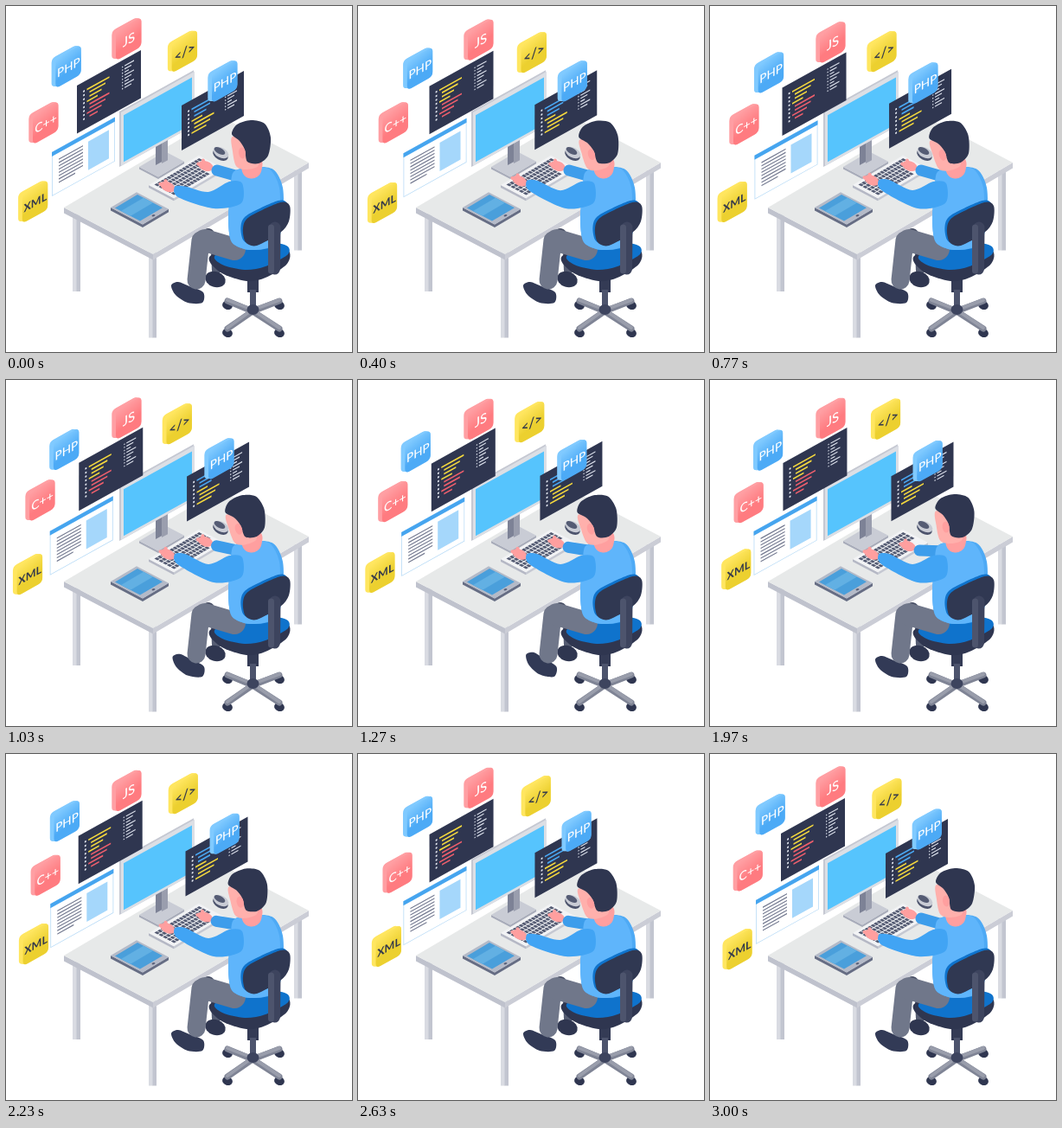
Recreate the animation shown at these times as an HTML page with a canvas. Size 400 by 400 pixels, loop 3.06 s.

```html
<!DOCTYPE html>
<html lang="en">
<head>
<meta charset="utf-8">
<title>Programmer at a desk</title>
<style>
html, body { margin: 0; width: 100%; height: 100%; overflow: hidden; background: #fff; }
canvas { display: block; width: 100%; height: 100%; }
</style>
</head>
<body>
<canvas id="stage"></canvas>
<script>
const LOOP = 3060;
const RISE = -0.589, FALL = 0.524, WALL = -0.555; // slopes of the two floor axes and of upright panels
const NAVY = '#2f3650', STEEL = '#4d546d', SKIN = '#ff9f9f', PANTS = '#70778a';
const SHIRT = '#5fb5fb', SLEEVE = '#41a4f4', SEAT = '#0f73cc';
const YELLOW = '#f5d93d', RED = '#ee5f6c', BLUE = '#4aa9f5';

const canvas = document.getElementById('stage');
const ctx = canvas.getContext('2d');
const dpr = window.devicePixelRatio || 1;
canvas.width = canvas.height = 400 * dpr;

function rect(x, y, w, h, fill) {
  ctx.fillStyle = fill;
  ctx.fillRect(x, y, w, h);
}

function round(x, y, w, h, r, fill) {
  ctx.fillStyle = fill;
  ctx.beginPath();
  ctx.roundRect(x, y, w, h, r);
  ctx.fill();
}

function oval(x, y, rx, ry, turn, fill) {
  ctx.fillStyle = fill;
  ctx.beginPath();
  ctx.ellipse(x, y, rx, ry, turn, 0, Math.PI * 2);
  ctx.fill();
}

// Thick line with round ends
function limb(color, width, x0, y0, x1, y1) {
  ctx.strokeStyle = color;
  ctx.lineWidth = width;
  ctx.lineCap = 'round';
  ctx.beginPath();
  ctx.moveTo(x0, y0);
  ctx.lineTo(x1, y1);
  ctx.stroke();
}

// Smooth closed curve through a few points
function blob(fill, pts) {
  const n = pts.length, at = i => pts[(i + n) % n];
  ctx.fillStyle = fill;
  ctx.beginPath();
  ctx.moveTo(...pts[0]);
  for (let i = 0; i < n; i++) {
    const [a, b, c, d] = [at(i - 1), at(i), at(i + 1), at(i + 2)];
    ctx.bezierCurveTo(b[0] + (c[0] - a[0]) / 7, b[1] + (c[1] - a[1]) / 7,
      c[0] - (d[0] - b[0]) / 7, c[1] - (d[1] - b[1]) / 7, c[0], c[1]);
  }
  ctx.fill();
}

function within(matrix, draw) {
  ctx.save();
  ctx.transform(...matrix);
  draw();
  ctx.restore();
}
const floor = (x, y, draw) => within([1, RISE, 1, FALL, x, y], draw);
const wall = (x, y, draw) => within([1, WALL, 0, 1, x, y], draw);

function pivot(x, y, angle, draw) {
  const c = Math.cos(angle), s = Math.sin(angle);
  within([c, s, -s, c, x - c * x + s * y, y - s * x - c * y], draw);
}

// Flat box: left corner at x, y; sides a and b along the floor axes
function slab(x, y, a, b, h, top, left, right) {
  within([1, FALL, 0, 1, x, y], () => rect(0, 0, b, h, left));
  within([1, RISE, 0, 1, x + b, y + b * FALL], () => rect(0, 0, a, h, right));
  floor(x, y, () => rect(0, 0, a, b, top));
}

// Rises from 0 to 1 between a and b, falls back between c and d
function pulse(t, a, b, c, d) {
  const step = (p, q) => {
    const k = Math.min(1, Math.max(0, (t - p) / (q - p)));
    return k * k * (3 - 2 * k);
  };
  return step(a, b) - (d > c ? step(c, d) : 0);
}

function deskLeg(x, top, bottom) {
  rect(x, top, 5, bottom - top, '#d9dbe2');
  rect(x + 4.5, top, 4.5, bottom - top, '#c2c5d0');
}

function desk() {
  deskLeg(77, 240, 330);
  deskLeg(165, 284, 383.5);
  deskLeg(333, 190, 282.5);
  slab(67, 233, 180, 103, 6.5, '#e7e9e9', '#bfc2cd', '#cbcdd6');
}

function monitor() {
  slab(154, 186, 30, 22, 2.5, '#c9ccd5', '#a7abb9', '#a7abb9');
  wall(173, 160, () => {
    rect(0, 0, 14, 24, '#7d8296');
    rect(7, 0, 7, 26, '#9a9eae');
  });
  wall(131, 122, () => {
    rect(0, 0, 86, 64, '#c5c8d2');
    rect(2, 2, 85, 62, '#dcdfe5');
    rect(5, 7, 79, 54, '#56c4fd');
  });
}

function tablet() {
  slab(121, 233, 30, 37, 3.5, '#b4bac8', '#666d84', '#666d84');
  floor(121, 233, () => {
    rect(2, 3, 26, 29, '#4a9fdb');
    rect(2, 10, 26, 11, '#62b0e3');
    oval(15, 34.5, 1.5, 1.2, 0, '#596078');
  });
}

function keyboard() {
  slab(165, 207, 58, 29, 3, '#f2f3f5', '#b5b8c5', '#c5c8d2');
  floor(165, 207, () => {
    for (let row = 0; row < 5; row++) {
      const keys = row > 2 ? 12 : 15;
      for (let i = 0; i < keys; i++) rect(3.5 + i * 3.5, 3 + row * 4.8, 2.7, 3.7, '#535a72');
    }
  });
}

function mouse() {
  oval(248, 172, 9.5, 6, 0.5, STEEL);
  oval(248.5, 169.5, 9.5, 5.8, 0.5, '#c9ccd5');
  oval(247, 167.5, 7, 3.5, 0.5, '#555c74');
}

function codePanel(x, y, w, h, rows, split, inks) {
  wall(x, y, () => {
    rect(0, 0, w, h, NAVY);
    for (let i = 0; i < rows; i++) {
      const top = 10 + i * 4.6, indent = i % 3 ? 3 : 0;
      rect(7.2, top, 1.8, 2, '#e9edf5');
      rect(11.5 + indent, top, 26 - (i % 4) * 4.5 - indent, 1.8, inks[i < split ? 0 : 1]);
    }
    for (let i = 0; i < 8; i++) {
      const top = 7 + i * 3.6;
      rect(w - 22, top, 1.3, 1.3, '#dce1ec');
      rect(w - 19, top, 11 - (i % 3) * 3, 1.3, '#dce1ec');
    }
  });
}

function pagePanel(x, y) {
  wall(x, y, () => {
    rect(0, 0, 73, 51, '#b9dcf7');
    rect(0.8, 0, 71.4, 50.2, '#fff');
    rect(0, 0, 73, 5, '#46a5ef');
    for (let i = 0; i < 8; i++) rect(8, 12 + i * 3.8, i === 7 ? 19 : 28, 1.3, '#737990');
    rect(42, 11, 24, 33, '#a5d7fb');
  });
}

function tile(x, y, [face, light, ink, weight], text, size) {
  wall(x, y, () => {
    for (let i = 0; i < 5; i++) round(0.3 + i, 16 + i * 0.6, 30, 34, 5, light);
    const shade = ctx.createLinearGradient(0, 18, 10, 54);
    shade.addColorStop(0.1, light);
    shade.addColorStop(0.75, face);
    round(5, 18.8, 29.5, 34.4, 5, shade);
    ctx.fillStyle = ink;
    ctx.font = `${weight} ${size}px Lato, "Open Sans", sans-serif`;
    ctx.textAlign = 'center';
    ctx.textBaseline = 'middle';
    ctx.fillText(text, 20, 37.5);
  });
}

function screens(t) {
  const a = t / LOOP * Math.PI * 2, c = Math.cos(a), s = Math.sin(a), k = (1 - c) / 2;
  codePanel(82 + 3 * k, 92 + 5 * k, 74, 55.5, 8, 4, [YELLOW, RED]);
  codePanel(203 + 8 * k, 115 - 4.5 * k, 72, 52, 7, 3, [BLUE, YELLOW]);
  pagePanel(53 - 3 * k, 169 + 7.5 * k);

  const blue = ['#4caaf6', '#80caff', '#fff', 500];
  const red = ['#ff7b80', '#ff9fa3', '#fff', 500];
  const gold = ['#ecd02f', '#ffe660', '#353a4b', 700];
  const dx = 0.8 * c - 3.2 * s, dy = -3.5 * c - 1.5 * s;
  const ex = 2.2 * c - 3.3 * s, ey = 2.8 * c + 3.3 * s;
  tile(122, 13 + 8 * k, red, 'JS', 15);
  tile(52.3 - 3.2 * k, 45 + 14 * k, blue, 'PHP', 13.5);
  tile(25.2 + dx, 113.5 + dy, red, 'C++', 14);
  tile(232.2 + dx, 65.5 + dy, blue, 'PHP', 13.5);
  tile(11.6 + ex, 198.4 + ey, gold, 'XML', 12.5);
  tile(184.4 + ex, 24.6 + ey, gold, '</>', 15);
}

function chairBase() {
  rect(279, 300, 13, 31, '#343b55');
  for (const sy of [-1, 1]) {
    for (const sx of [-1, 1]) {
      const x = 286 + 30 * sx, y = 361 + 16 * sy;
      oval(x, y + 1, 6, 5, 0.3, NAVY);
      limb('#7f8495', 7, 285, 353, x, y - 4);
      limb('#999dab', 4, 285, 351, x, y - 5);
    }
  }
  rect(282, 328, 7, 24, STEEL);
  oval(285.5, 351, 7, 6, 0, '#3d445e');
}

function seat() {
  blob(NAVY, [[236, 289], [248, 308], [278, 318], [300, 314], [325, 298], [325, 281], [285, 270]]);
  blob(SEAT, [[242, 288], [250, 299], [276, 305], [300, 301], [326, 287], [322, 276], [280, 272]]);
}

function legs(tap) {
  limb('#464d63', 14, 222, 272, 234, 264);
  limb('#555c72', 10, 242, 286, 243, 306);
  oval(242, 316, 12, 9, 0.3, NAVY);
  seat();
  pivot(226, 340, tap * 0.165, () =>
    blob('#323a56', [[191, 323], [199, 319], [212, 324], [228, 331], [227, 343], [210, 343], [196, 334]]));
  limb(PANTS, 21, 225, 271, 220, 317);
  limb(PANTS, 26, 230, 271, 264, 281);
}

function hand(x, y, tilt) {
  pivot(x, y, tilt, () => {
    oval(x, y, 9, 5.5, 0.2, SKIN);
    limb(SKIN, 4, x - 3, y - 3, x - 4, y - 6);
    limb(SKIN, 4, x - 5, y, x - 9, y - 1);
  });
}

function rightArm(reach) {
  const x = 231 - reach * 3, y = 185 + reach * 11;
  hand(x, y, 0.15);
  limb('#3d9deb', 13, x + 13, y + 5, 272, 198);
}

function torso() {
  const body = [[263, 192], [285, 186], [309, 189], [320, 210], [320, 245], [312, 276],
    [282, 282], [261, 273], [257, 245], [260, 215]];
  blob('#4eaaf5', body);
  blob(SHIRT, body.map(([x, y]) => [x > 300 ? x - 4 : x, y]));
}

function leftArm(lift) {
  const y = 209 - lift * 7.5;
  hand(187, y, 0.25);
  blob(SLEEVE, [[195, y], [207, y - 0.5], [234, 215 - lift * 2], [258, 203], [273, 205],
    [272, 228], [240, 234], [199, y + 12]]);
}

function head(turn) {
  limb(SKIN, 23, 285, 183, 284, 188);
  pivot(285, 195, -turn * 0.17, () => {
    blob('#ffb0ac', [[262, 151], [262, 168], [266, 185], [277, 189], [292, 184], [288, 160]]);
    blob(NAVY, [[261, 148], [267, 137], [283, 132], [299, 136], [306, 152], [303, 173],
      [292, 182], [279, 180], [276, 166], [270, 156]]);
    oval(273, 170, 4, 6.5, -0.15, SKIN);
  });
}

function chairBack() {
  const pad = [[274, 257], [281, 244], [317, 227], [328, 231], [327, 249], [317, 262], [290, 277], [277, 273]];
  blob(SEAT, pad.map(([x, y]) => [x - 2.5, y - 2]));
  blob('#303852', pad);
  limb('#3d445e', 13, 311, 256, 310.5, 304);
  limb(STEEL, 7, 306.5, 256, 306.5, 306);
}

function draw(t) {
  ctx.setTransform(dpr, 0, 0, dpr, 0, 0);
  rect(0, 0, 400, 400, '#fff');
  const turn = pulse(t, 0, 600, 1250, 1640) + pulse(t, 1850, 2560, 2680, 2980);
  const lift = pulse(t, 0, 500, 2230, 2560);
  const tap = pulse(t, 820, 1230, 1310, 1660);
  const reach = 0.3 * pulse(t, 770, 1270, 2630, 2980) + 0.7 * pulse(t, 1270, 1670, 1700, 2230);

  desk();
  monitor();
  tablet();
  keyboard();
  mouse();
  screens(t);
  chairBase();
  legs(tap);
  rightArm(reach);
  torso();
  head(turn);
  leftArm(lift);
  chairBack();
}

const start = performance.now();
function frame() {
  draw((performance.now() - start) % LOOP);
  requestAnimationFrame(frame);
}
frame();
</script>
</body>
</html>
```
